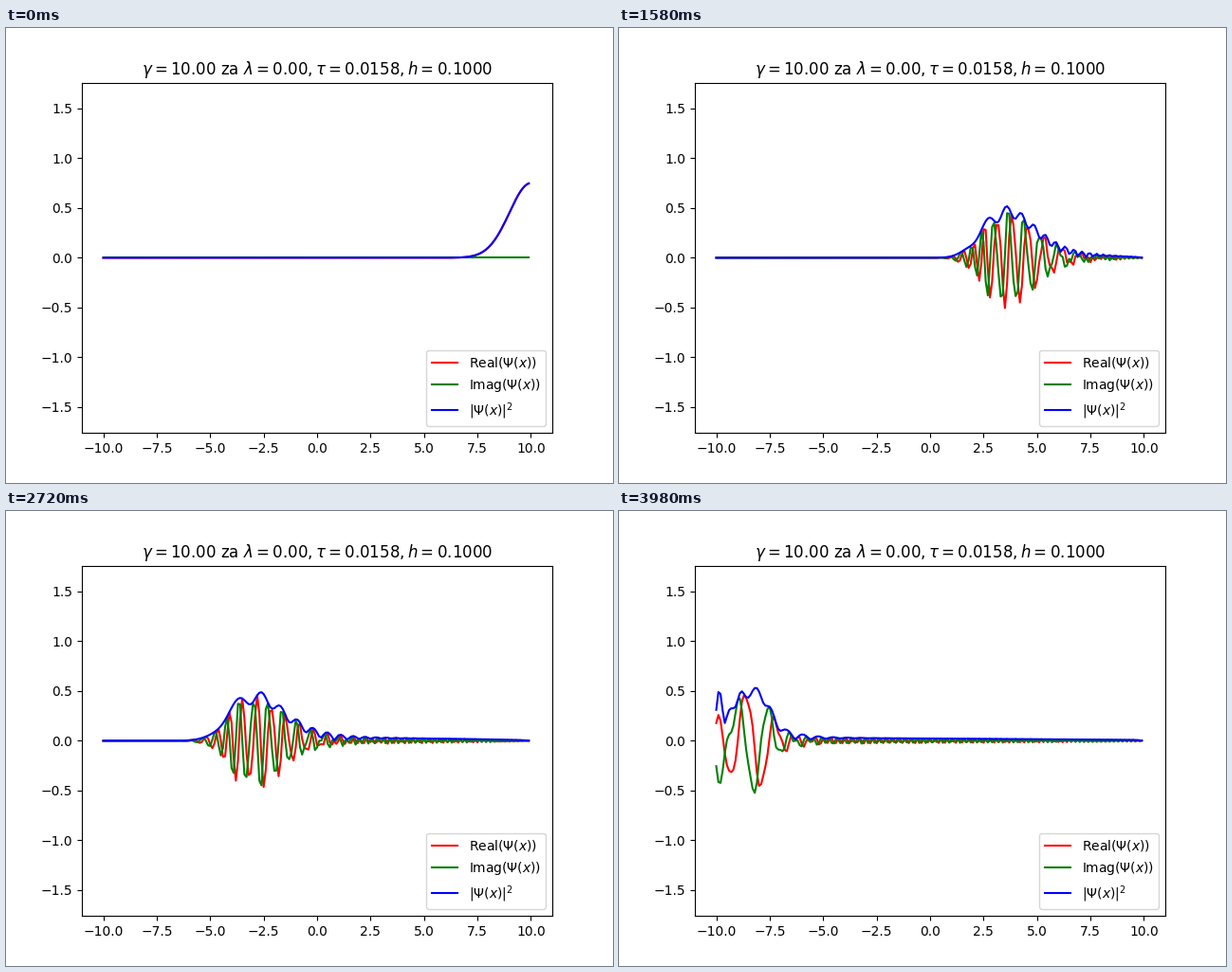
Recreate the animation shown at these times as a matplotlib script. Size 640 by 480 pixels, loop 4 s.

```python
import numpy as np
import matplotlib.pyplot as plt
from matplotlib.animation import FuncAnimation

FRAMES = 200
GAMMA, LAM = 10.0, 0.0
H = 0.1
TAU = np.pi / (FRAMES - 1)

x = -10 + H * np.arange(200)


def propagator():
    """Crank-Nicolson step for the oscillator, psi = 0 outside the grid."""
    n = len(x)
    potential = x**2 / 2 + LAM * x**4
    ham = np.diag(1 / H**2 + potential)
    ham -= (np.eye(n, k=1) + np.eye(n, k=-1)) / (2 * H**2)
    step = 0.5j * TAU * ham
    return np.linalg.solve(np.eye(n) + step, np.eye(n) - step)


def evolve():
    step = propagator()
    psi = np.pi**-0.25 * np.exp(-(x - GAMMA)**2 / 2) + 0j
    states = [psi]
    for _ in range(FRAMES - 1):
        psi = step @ psi
        states.append(psi)
    return states


states = evolve()

fig, ax = plt.subplots(figsize=(6.4, 4.8), dpi=100)
ax.set_xlim(-11, 11)
ax.set_ylim(-1.76, 1.76)
ax.set_title(rf"$\gamma = {GAMMA:.2f}$ za $\lambda = {LAM:.2f}, "
             rf"\tau = {TAU:.4f}, h = {H:.4f}$")

parts = [
    (np.real, "r", r"Real($\Psi(x)$)"),
    (np.imag, "g", r"Imag($\Psi(x)$)"),
    (np.abs, "b", r"$|\Psi(x)|^2$"),
]
lines = [ax.plot(x, part(states[0]), color, label=label)[0]
         for part, color, label in parts]
ax.legend(loc="lower right")


def update(i):
    for line, (part, _, _) in zip(lines, parts):
        line.set_ydata(part(states[i]))
    return lines


anim = FuncAnimation(fig, update, frames=FRAMES, interval=20,
                     repeat=True, repeat_delay=0)
plt.show()
```
